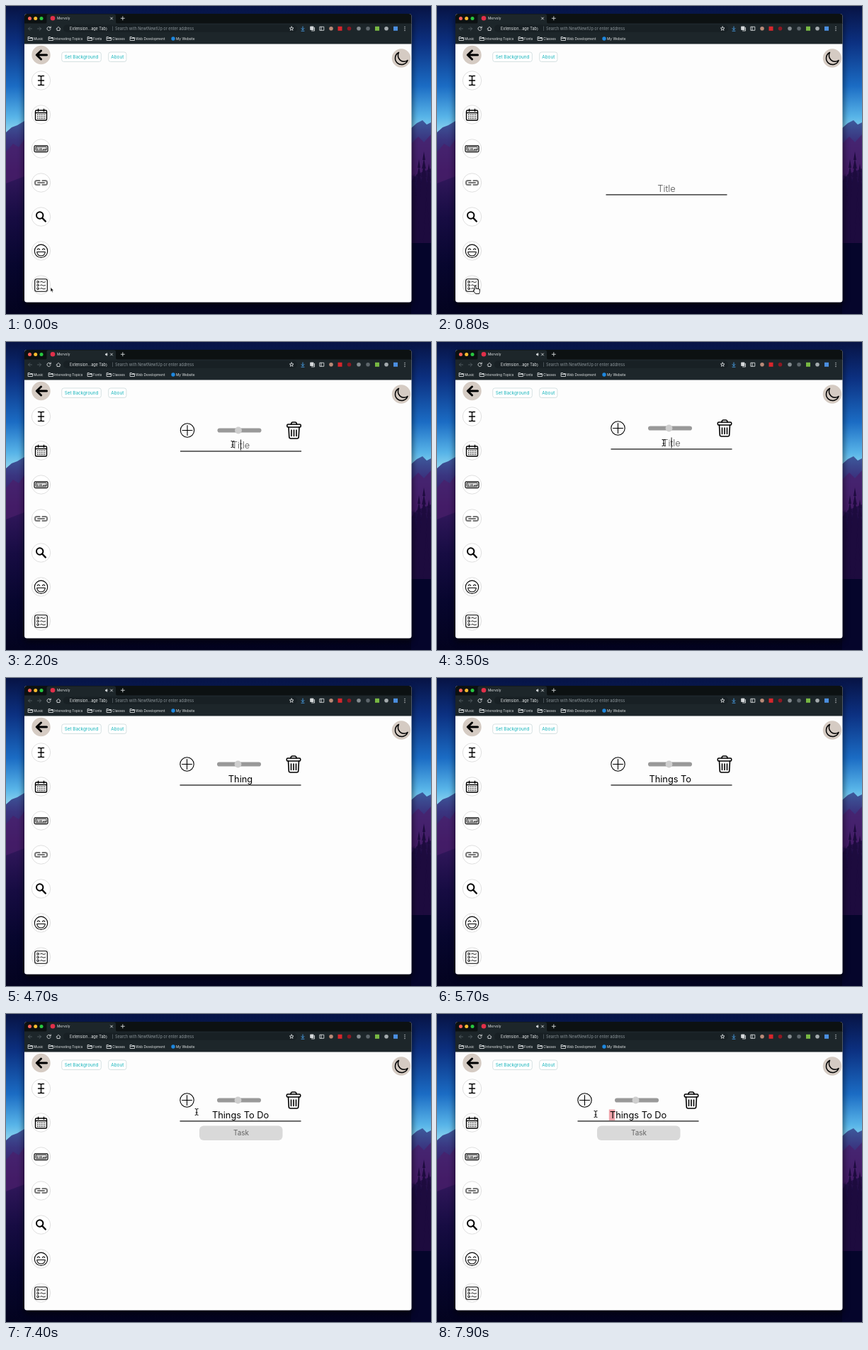
Write an HTML page that moves like this. It is 600 px wide and 434 px high and loops after 8000 ms.

```html
<!DOCTYPE html>
<html lang="en">
<head>
<meta charset="utf-8">
<title>Notes board</title>
<style>
  html, body { margin: 0; width: 100%; height: 100%; overflow: hidden; background: #03031f; }
  svg { display: block; width: 100vw; height: 100vh; }
  text { font-family: Inter, "Open Sans", sans-serif; white-space: pre; }
  .line { fill: none; stroke: #000; stroke-linecap: round; stroke-linejoin: round; }
  .bar { fill: none; stroke: #d5d9db; stroke-width: .9; stroke-linecap: round; stroke-linejoin: round; }
  .dim { stroke: #566066; }
  .mid { text-anchor: middle; }
</style>
</head>
<body>
<svg viewBox="0 0 600 434" preserveAspectRatio="none">
  <defs>
    <linearGradient id="sky" x2="0" y2="1">
      <stop offset="0" stop-color="#071344"/>
      <stop offset=".12" stop-color="#0c3182"/>
      <stop offset=".26" stop-color="#1b6cc4"/>
      <stop offset=".36" stop-color="#58b4e8"/>
      <stop offset=".41" stop-color="#8ed4ef"/>
    </linearGradient>
    <linearGradient id="hill" x2="0" y2="1">
      <stop offset="0" stop-color="#3d5a9c"/>
      <stop offset=".1" stop-color="#3a3580"/>
      <stop offset=".25" stop-color="#35195f"/>
      <stop offset=".5" stop-color="#170c43"/>
      <stop offset=".75" stop-color="#07062e"/>
      <stop offset="1" stop-color="#03031f"/>
    </linearGradient>
    <filter id="blur" x="-10%" y="-10%" width="120%" height="120%"><feGaussianBlur stdDeviation="4"/></filter>
    <clipPath id="frame"><rect x="26" y="11" width="546.5" height="406.5" rx="3.5"/></clipPath>
  </defs>

  <!-- desktop -->
  <rect width="600" height="434" fill="url(#sky)"/>
  <path fill="url(#hill)" d="M0 178L8 171 16 168 26 162 300 190 572 172 580 165 588 161 594 167 600 164V434H0Z"/>
  <path fill="#4a1f6c" opacity=".7" d="M0 206L10 194 18 199 26 188V240L0 250ZM572 194L582 184 590 192 600 181V250L572 238Z"/>
  <path fill="#170a3c" d="M572 247L580 237 600 229V335H572Z" opacity=".7"/>
  <g id="trees" fill="#1d0b3e"></g>
  <rect x="572" y="334" width="28" height="100" fill="#05052b"/>
  <rect x="25" y="14" width="549" height="409" rx="5" opacity=".55" filter="url(#blur)"/>

  <!-- browser -->
  <g clip-path="url(#frame)">
    <rect x="26" y="11" width="547" height="407" fill="#fdfdfd"/>
    <rect x="26" y="11" width="547" height="14" fill="#0c1112"/>
    <path d="M55 25q2.5 0 2.5-3V14q0-2.500 2.500-2.500h92.500q2.500 0 2.500 2.500v8q0 3 2.500 3Z" fill="#1d262a"/>
    <rect x="26" y="24.500" width="547" height="29" fill="#1d262a"/>
    <rect x="81" y="26.500" width="330" height="10.500" rx="5" fill="#182024"/>
  </g>
  <circle cx="33.500" cy="17.500" r="2.500" fill="#ff5f57"/>
  <circle cx="41.700" cy="17.500" r="2.500" fill="#febc2e"/>
  <circle cx="50" cy="17.500" r="2.500" fill="#28c840"/>
  <circle cx="66" cy="17.200" r="3.300" fill="#e2304a"/>
  <path class="bar" d="M147.500 16l3 3m0-3l-3 3M162.300 17.300h5m-2.500-2.500v5"/>
  <path id="sound" fill="#d5d9db" d="M140 16.400h1.300l1.700-1.500v5l-1.700-1.500H140ZM143.700 16.200q1 1.200 0 2.400Z"/>
  <path class="bar dim" d="M36.500 32h-5m2.300-2.300L31.500 32l2.300 2.300M44.500 32h5m-2.300-2.300l2.300 2.300-2.300 2.300"/>
  <path class="bar" d="M62.800 30.600A2.600 2.600 0 1 0 63 32.800M63.200 29v2h-2M71 32.200l3-2.800 3 2.800M72 32v2.500h4V32"/>
  <path class="bar" stroke-width=".7" d="M403.200 29l.8 1.900 2 .1-1.600 1.300.6 2-1.800-1.100-1.800 1.100.6-2-1.600-1.300 2-.1Z"/>
  <path class="bar" style="stroke:#4aa3ee" d="M419 29v4.500m-2-2l2 2 2-2M417 35.200h4"/>
  <path class="bar" d="M430 29h4v4.500h-4ZM431.500 35h4v-4.500M443.200 29.300h5.600v5h-5.600ZM445 29.300v5"/>
  <path fill="#d5d9db" d="M430 29h4v4.500h-4Z"/>
  <g id="addons"></g>
  <path class="bar" style="stroke-width:1.300" d="M563 29.500h.01M563 32h.01M563 34.500h.01"/>
  <g fill="#e4e7e8">
    <text x="72" y="19.200" font-size="4.800">Mervoly</text>
    <text x="90" y="34" font-size="5.500">Extension...age Tab)</text>
    <text x="154" y="34" font-size="5.500" fill="#8b9499">Search with NewtNewtUp or enter address</text>
    <rect x="150" y="28.500" width=".6" height="6.500" fill="#6b757a"/>
    <g id="marks" font-size="4.800"></g>
  </g>
  <circle cx="236" cy="46" r="2.700" fill="#1e88e0"/>

  <!-- page -->
  <circle cx="49.500" cy="69" r="13.200" fill="#d5cbc3"/>
  <path class="line" stroke-width="3" stroke-linecap="butt" d="M57.500 69H43.500M49.500 63l-6.300 6 6.300 6"/>
  <g fill="#fff" stroke="#c5d5d6" stroke-width=".7">
    <rect x="78.700" y="65" width="55.600" height="13.500" rx="3"/>
    <rect x="144.700" y="65" width="25.200" height="13.500" rx="3"/>
  </g>
  <g class="mid" font-size="6.350" fill="#12b3ba">
    <text x="106.500" y="74">Set Background</text>
    <text x="157.300" y="74">About</text>
  </g>
  <circle cx="558" cy="73.500" r="13.200" fill="#d5cbc3"/>
  <path class="line" stroke-width="1.500" d="M554.500 65.500A9 9 0 1 0 567 76.500A8.500 8.500 0 0 1 554.500 65.500Z"/>

  <g id="rings" fill="#fff" stroke="#dcdcdc" stroke-width=".9"></g>
  <g class="line" stroke-width="1.400">
    <path d="M45.500 98.500h2.500q1.500 0 1.500 1.500 0-1.500 1.500-1.500h2.500M45.500 111.500h2.500q1.500 0 1.500-1.500 0 1.500 1.500 1.500h2.500M49.500 99.500v11M45.500 105h8"/>
    <rect x="41.500" y="147" width="16" height="14" rx="1.500"/>
    <path d="M41.500 150.500h16M45.500 145.200v3M53.500 145.200v3"/>
    <path stroke-width="1.500" stroke-dasharray=".01 2.500" d="M44.600 153.300h10.500M44.600 155.900h10.500M44.600 158.500h10.500"/>
    <rect x="40" y="196.800" width="19" height="8.800" rx="1.500" stroke-width="1.200"/>
    <rect x="42" y="198.700" width="15" height="5" rx=".6" stroke-width=".8"/>
    <g stroke="#777" stroke-width="2">
      <path d="M47.500 246.300V246h-4q-2.500 0-2.500 2.500v1q0 2.500 2.500 2.500h4v-.3M51.500 246.300V246h4q2.500 0 2.500 2.500v1q0 2.500-2.500 2.500h-4v-.3M45 249h9"/>
    </g>
    <circle cx="47.700" cy="295" r="4.700" stroke-width="2"/>
    <path stroke-width="2.400" d="M51.500 299l4.300 4.500"/>
    <g stroke-width="1.100">
      <circle cx="49.500" cy="345.300" r="9.200"/>
      <path d="M43.700 346.500h11.600q-.5 5.500-5.800 5.500t-5.800-5.500ZM44.200 343.300q1.700-2.500 3.400 0M51.400 343.300q1.700-2.500 3.400 0"/>
      <rect x="40.700" y="384.800" width="17.600" height="17.400" rx="2.500"/>
    </g>
    <g id="rows" stroke-width=".9"></g>
  </g>
  <text class="mid" x="49.500" y="202.500" font-size="3.200" font-weight="700">12:00 pm</text>

  <!-- list card, origin at the middle of its underline -->
  <g id="card">
    <g id="tools">
      <circle class="line" cx="-75.500" cy="-29.500" r="9.700" stroke-width="1.100"/>
      <path class="line" stroke-width="1.100" d="M-82.500-29.500h14m-7-7v14"/>
      <rect x="-33" y="-32.600" width="62" height="6.200" rx="3.100" fill="#999"/>
      <circle cx="-3.500" cy="-29.500" r="4.900" fill="#cecece"/>
      <g class="line" stroke-width="1.600">
        <rect x="65.300" y="-38" width="19.400" height="4" rx="1.500"/>
        <path d="M71-38q0-3 2.500-3h3q2.500 0 2.500 3M67.500-34l.8 14q.2 2 2.200 2h9q2 0 2.200-2l.8-14M71.500-30v8.500M75-30v8.500M78.500-30v8.500"/>
      </g>
    </g>
    <rect id="pick" x="-41.200" y="-16.500" width="8.500" height="15.500" fill="#f0a5ac"/>
    <text id="title" class="mid" y="-4.200" font-size="12.800"></text>
    <rect id="caret" x="-.4" y="-16.500" width=".9" height="15"/>
    <rect x="-85.500" y="-.7" width="171" height="1.300" fill="#222"/>
    <g id="task">
      <rect x="-58" y="6.500" width="117.500" height="20.500" rx="6" fill="#d9d9d9"/>
      <text class="mid" x="1" y="20.400" font-size="9.900" fill="#636363">Task</text>
    </g>
  </g>

  <g id="pointer">
    <path id="arrow" stroke="#fff" stroke-width=".5" d="M0 0V6l1.400-1.200 1 2.200 1-.5-1-2.100h1.800Z"/>
    <path id="hand" fill="#fff" stroke="#000" stroke-width=".9" stroke-linejoin="round" d="M-1 1q1-1.500 2 0v3.500l1-.6 1 .8 1-.4 1 .8 1.300-.1V8.500L5.500 11.500H.5L-2.800 7q.2-1.600 1.800-.4Z"/>
    <path id="beam" class="line" stroke-width="1" d="M-2-4.500Q0-4.500 0-3.500 0-4.500 2-4.500M-2 4.500Q0 4.500 0 3.500 0 4.500 2 4.500M0-3.500v7M-1 1h2"/>
  </g>
</svg>
<script>
const $ = id => document.getElementById(id);
const LOOP = 8000, STEP = 100;

// Repeated static parts
const fill = (id, items, draw) => { $(id).innerHTML = items.map(draw).join(''); };

fill('trees', [[576, 236], [583, 216], [590, 205], [597, 222], [579, 262], [594, 270]], ([x, y]) => {
  let d = `M${x} ${y}`;
  for (let i = 1; i < 8; i++) d += `L${x + i * .9 + 1} ${y + i * 12}h-1.500`;
  d += `V335H${x - 5}`;
  for (let i = 7; i > 0; i--) d += `L${x - i * .9 + .5} ${y + i * 12}h-1.500`;
  return `<path d="${d}Z"/>`;
});
fill('marks', [[39, 'Music'], [68, 'Interesting Topics'], [123, 'Fonts'], [150, 'Classes'],
  [183, 'Web Development'], [240, 'My Website']], ([x, s]) =>
  `<text x="${x}" y="47.600">${s}</text>` +
  (s === 'My Website' ? '' : `<path class="bar" stroke-width=".8" d="M${x - 7.500} 43.500h2l.8 1h3.200v4h-6ZM${x - 7.500} 45.500h6"/>`));
fill('addons', [[459, '#b98a78'], [471.500, '#d8262c', 1], [484.500, '#8e1822'], [498, '#858c90'],
  [511, '#5d666b'], [524, '#78b843', 1], [537, '#a4abae'], [550, '#4b8fe0', 1]], ([x, c, square]) =>
  square ? `<rect x="${x - 3}" y="28.800" width="6" height="6" fill="${c}"/>`
         : `<circle cx="${x}" cy="31.800" r="2.800" fill="${c}"/>`);
fill('rings', [0, 1, 2, 3, 4, 5, 6], i => `<circle cx="49.500" cy="${105 + 48 * i}" r="13.200"/>`);
fill('rows', [388.800, 393.500, 398.200], y =>
  `<circle cx="45" cy="${y}" r="1.400"/><path d="M48.500 ${y}q1.500-1.500 3 0t4 0"/>`);

// Timeline
const pointerPath = [[0, 63, 396.500], [500, 54, 394], [900, 54, 394], [1400, 309, 255], [1700, 309, 255],
  [2200, 320, 144], [2500, 320, 142], [6100, 320, 142], [6700, 259, 121.500], [7100, 259, 121.500],
  [7500, 271, 141], [7700, 271, 141], [7900, 224, 141]];
const cardPath = [[0, 324, 266], [1700, 324, 266], [2200, 331.500, 154], [2500, 331, 151],
  [7700, 331, 151], [7900, 284, 151]];
const phrase = 'Things To Do';
const keys = [4100, 4300, 4400, 4600, 4700, 4800, 5000, 5300, 5500, 5700, 5800, 6000];

const clamp = v => Math.max(0, Math.min(1, v));
const within = (t, a, b) => t >= a && t < b;
const show = (id, on) => { $(id).style.display = on ? '' : 'none'; };
const place = (id, x, y) => $(id).setAttribute('transform', `translate(${x} ${y})`);

function along(path, t) {
  const i = path.findIndex(p => p[0] > t);
  if (i < 0) return path[path.length - 1].slice(1);
  const [a, b] = [path[i - 1], path[i]];
  const u = (t - a[0]) / (b[0] - a[0]), e = u * u * (3 - 2 * u);
  return [a[1] + (b[1] - a[1]) * e, a[2] + (b[2] - a[2]) * e];
}

function render(t) {
  const [cx, cy] = along(cardPath, t);
  const [px, py] = along(pointerPath, t);
  const typed = keys.filter(k => k <= t).length;
  const cardOn = t >= 700;

  place('card', cx, cy);
  show('card', cardOn);
  $('tools').setAttribute('opacity', clamp((t - 1270) / 600));
  const title = $('title');
  title.textContent = typed ? phrase.slice(0, typed) : 'Title';
  title.setAttribute('fill', typed ? '#000' : '#505050');
  title.setAttribute('font-weight', typed ? 400 : 300);
  show('caret', within(t, 1800, 3000) || within(t, 3500, 4000));
  show('pick', t >= 7800);
  show('task', t >= 7100);
  show('sound', within(t, 1900, 5800) || t >= 7800);

  const onButton = Math.hypot(px - 49.500, py - 393) < 13 ||
    (cardOn && Math.hypot(px - cx + 75.500, py - cy + 29.500) < 10);
  const onTitle = cardOn && Math.abs(px - cx) < 85 && within(py, cy - 18, cy);
  place('pointer', px, py);
  show('pointer', !within(t, 4100, 6100));
  show('hand', onButton);
  show('beam', onTitle && !onButton);
  show('arrow', !onTitle && !onButton);
}

const start = performance.now();
function tick() {
  const t = (performance.now() - start) % LOOP;
  render(Math.floor(t / STEP) * STEP);
  requestAnimationFrame(tick);
}
tick();
</script>
</body>
</html>
```
